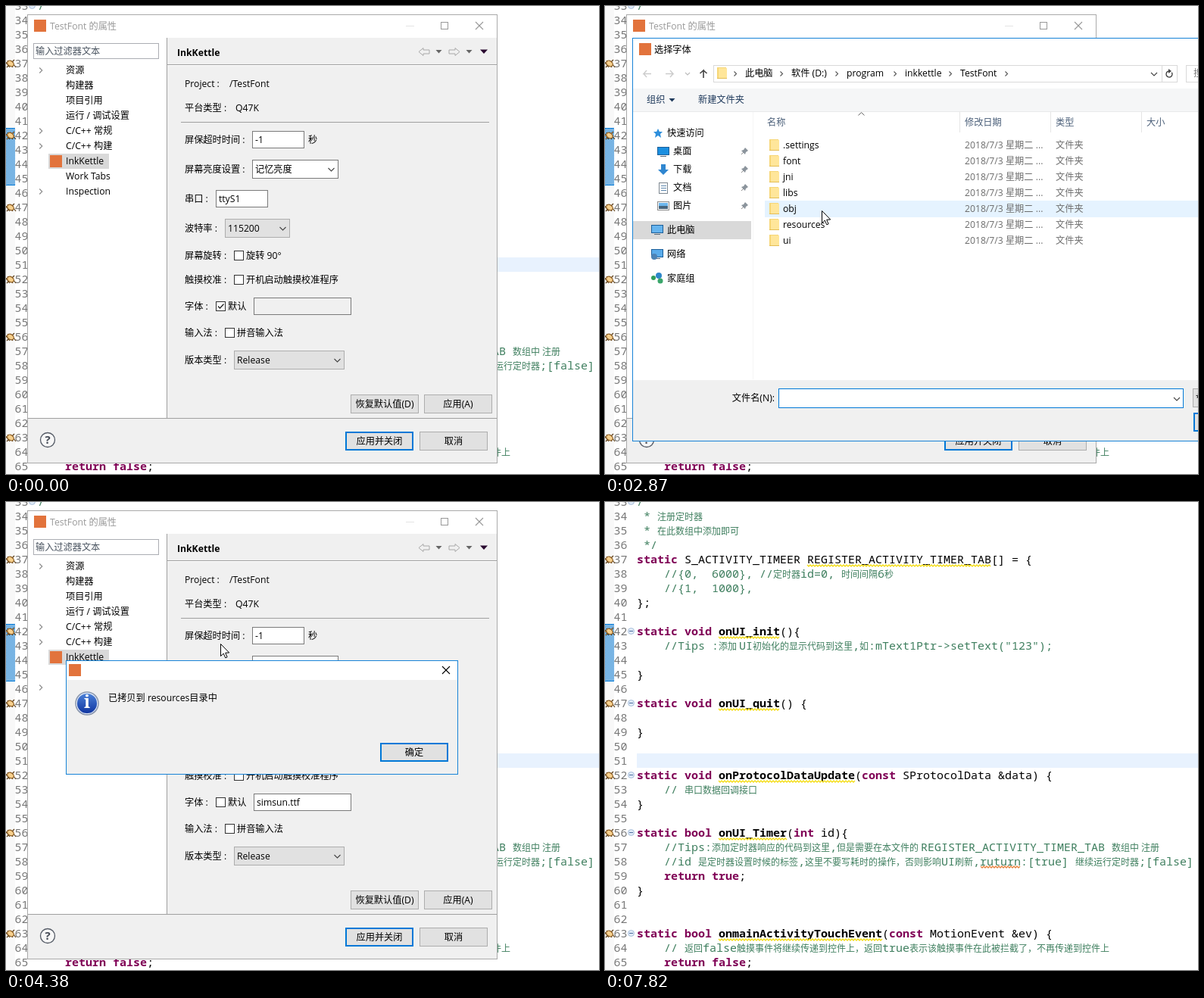
An HTML page with a canvas that plays this animation: 783x618 px, repeating every 8.5 s.

```html
<!DOCTYPE html>
<html lang="zh">
<head>
<meta charset="utf-8">
<style>
html, body { margin: 0; width: 100%; height: 100%; overflow: hidden; background: #fff; }
canvas { display: block; }
</style>
</head>
<body>
<canvas id="stage" width="783" height="618"></canvas>
<script>
const c = document.getElementById('stage').getContext('2d');
const LOOP = 8500;
const CJK = '"Noto Sans CJK SC", "Noto Sans CJK"';
const UI = `12.2px "Open Sans", ${CJK}, sans-serif`;
const MONO = '15px "Noto Sans Mono", "DejaVu Sans Mono", monospace';
const HAN = `12px ${CJK}, sans-serif`;
const BLUE = '#0078d7', FACE = '#f0f0f0', LOGO = '#e2733c';
const PRODUCT = 'InkKettle';

// ---- drawing helpers ----
function rect(x, y, w, h, fill) { c.fillStyle = fill; c.fillRect(x, y, w, h); }
function box(x, y, w, h, fill, stroke, lw = 1) {
  rect(x, y, w, h, fill);
  c.strokeStyle = stroke; c.lineWidth = lw;
  c.strokeRect(x + lw / 2, y + lw / 2, w - lw, h - lw);
}
function text(s, x, yMid, color = '#000', font = UI, align = 'left') {
  c.font = font; c.fillStyle = color; c.textAlign = align;
  c.fillText(s, x, yMid + 4.3);
}
function trace(points, x = 0, y = 0) {
  c.beginPath();
  points.forEach(([px, py]) => c.lineTo(x + px, y + py));
}
function line(points, color, lw = 1, x = 0, y = 0) {
  trace(points, x, y); c.strokeStyle = color; c.lineWidth = lw; c.stroke();
}
function poly(points, color, x = 0, y = 0) {
  trace(points, x, y); c.closePath(); c.fillStyle = color; c.fill();
}
function disc(x, y, r, fill, stroke, lw = 1) {
  c.beginPath(); c.arc(x, y, r, 0, 7);
  if (fill) { c.fillStyle = fill; c.fill(); }
  if (stroke) { c.strokeStyle = stroke; c.lineWidth = lw; c.stroke(); }
}
const down = (x, y, color = '#444', s = 4) => line([[-s, -s / 2], [0, s / 2], [s, -s / 2]], color, 1.1, x, y);
const right = (x, y, color = '#777', s = 3.5) => line([[-s / 2, -s], [s / 2, 0], [-s / 2, s]], color, 1.1, x, y);
const triangle = (x, y, color) => poly([[-4, -2], [4, -2], [0, 2.5]], color, x, y);
const logo = (x, y) => rect(x, y, 16, 16, LOGO);
function cross(x, y, color) {
  line([[-5, -5], [5, 5]], color, 1.1, x, y);
  line([[-5, 5], [5, -5]], color, 1.1, x, y);
}

// ---- pointer ----
// start, end, steps, from, to, bow of the path
const moves = [
  [290, 1090, 11, [690, 612], [282, 395], [0, 0]],
  [1550, 1860, 5, [282, 395], [353, 398], [0, 0]],
  [2480, 3180, 10, [353, 398], [250, 201], [0, 0]],
  [3590, 3990, 6, [250, 201], [283, 187], [0, 0]],
  [4460, 5410, 13, [283, 187], [527, 326], [0, 18]],
  [6100, 6710, 9, [527, 326], [512, 567], [13, 0]],
  [7250, 7820, 8, [512, 567], [792, 616], [0, 0]]
];
function pointerAt(t) {
  if (t < 290 || t >= 7820) return [-99, -99];
  const [start, end, steps, from, to, bow] = moves.filter(m => m[0] <= t).pop();
  const k = Math.min(steps - 1, Math.floor((t - start) / (end - start) * (steps - 1) + 1e-6));
  const p = (k + 1) / steps, e = p * p * (3 - 2 * p);
  return [0, 1].map(i => from[i] + (to[i] - from[i]) * e + bow[i] * Math.sin(Math.PI * p));
}
let mx, my;
const over = (x, y, w, h) => mx >= x && mx < x + w && my >= y && my < y + h;
function drawPointer() {
  const arrow = [[0, 0], [0, 16], [3.7, 12.6], [6.3, 18.3], [8.6, 17.3], [6.2, 11.7], [11.2, 11.5]];
  const x = Math.round(mx) + .5, y = Math.round(my) + .5;
  poly(arrow, '#fff', x, y);
  line([...arrow, [0, 0]], '#000', 1, x, y);
}

// ---- editor ----
const PURPLE = '#7f0055', GREEN = '#3f7f5f', WARNING = '#f4dc10';
// style marks: ~keyword~  ^bold^  `plain`  #comment to end of line; ^ and ` carry a warning underline
const code = {
  33: '#/**', 34: '# * 注册定时器', 35: '# * 在此数组中添加即可', 36: '# */',
  37: '~static~ S_ACTIVITY_TIMEER `REGISTER_ACTIVITY_TIMER_TAB`[] = {',
  38: '    #//{0,  6000}, //定时器id=0, 时间间隔6秒',
  39: '    #//{1,  1000},', 40: '};',
  42: '~static~ ~void~ ^onUI_init^(){',
  43: '    #//Tips :添加 UI初始化的显示代码到这里,如:mText1Ptr->setText("123");',
  45: '}', 47: '~static~ ~void~ ^onUI_quit^() {', 49: '}',
  52: '~static~ ~void~ ^onProtocolDataUpdate^(~const~ SProtocolData &data) {',
  53: '    #// 串口数据回调接口', 54: '}',
  56: '~static~ ~bool~ ^onUI_Timer^(~int~ id){',
  57: '    #//Tips:添加定时器响应的代码到这里,但是需要在本文件的 REGISTER_ACTIVITY_TIMER_TAB 数组中 注册',
  58: '    #//id 是定时器设置时候的标签,这里不要写耗时的操作，否则影响UI刷新,ruturn:[true] 继续运行定时器;[false]',
  59: '    ~return~ ~true~;', 60: '}',
  63: '~static~ ~bool~ ^onmainActivityTouchEvent^(~const~ MotionEvent &ev) {',
  64: '    #// 返回false触摸事件将继续传递到控件上，返回true表示该触摸事件在此被拦截了，不再传递到控件上',
  65: '    ~return~ ~false~;'
};
const isHan = ch => ch > '\u2fff';
function squiggle(x0, x1, y, color) {
  const points = [];
  for (let x = x0, i = 0; x <= x1; x += 2, i++) points.push([x, y + (i % 2 ? 1 : -1)]);
  line(points, color, 1.3);
}
function codeLine(s, y) {
  let x = 42, color = '#000', mark = '', markX = 0, afterHan = false;
  for (const ch of s) {
    if (ch === '#') { color = GREEN; continue; }
    if ('~^`'.includes(ch)) {
      if (mark && ch !== '~') squiggle(markX, x, y + 3, WARNING);
      mark = mark ? '' : ch;
      markX = x;
      color = mark === '~' ? PURPLE : '#000';
      continue;
    }
    const han = isHan(ch), bold = mark === '~' || mark === '^';
    c.textAlign = 'left';
    c.font = han ? HAN : (bold ? 'bold ' : '') + MONO;
    c.fillStyle = color;
    c.fillText(ch, x, y);
    x += han ? 12 : ch === ' ' && afterHan ? 3 : 9;
    afterHan = han;
  }
}
function bug(y) {
  for (const d of [-4, 0, 4]) line([[d - 4, -4], [d + 3, 5]], '#5a3c14', 1.2, 6, y);
  line([[1, 5], [11, -5]], '#5a3c14', 1.2, 0, y);
  c.beginPath(); c.ellipse(6, y, 4.6, 3.4, .6, 0, 7);
  c.fillStyle = '#f6cf8c'; c.fill();
  c.strokeStyle = '#8a5a20'; c.lineWidth = 1.2; c.stroke();
}
function drawEditor() {
  rect(0, 0, 783, 618, '#fff');
  rect(0, 0, 12, 618, '#f8f8f8');
  rect(42, 332, 741, 19, '#e8f2fe');
  rect(0, 161, 12, 76, FACE);
  c.fillStyle = BLUE;
  for (let y = 161; y < 236; y++) for (let x = y % 2; x < 12; x += 2) c.fillRect(x, y, 1, 1);
  rect(0, 161, 12, 1, BLUE);
  rect(0, 236, 12, 1, BLUE);
  for (let n = 33; n <= 65; n++) {
    const y = 24 + (n - 34) * 19;
    c.font = MONO; c.fillStyle = '#787878'; c.textAlign = 'left';
    c.fillText(n, 11.5, y);
    if (code[n]) codeLine(code[n], y);
  }
  for (const n of [33, 37, 42, 47, 52, 56, 63]) {
    const y = 19 + (n - 34) * 19;
    if (n !== 33) bug(y);
    if (n !== 37) {
      disc(34.5, y - .5, 4, '#dfeaf7', '#a9bfdc');
      line([[32, y - .5], [37, y - .5]], '#4d6f9e');
    }
  }
  squiggle(496, 549, 482, '#e8823c');
}

// ---- controls ----
function button(x, y, label, primary) {
  const hot = over(x, y, 90, 25);
  box(x, y, 90, 25, hot ? '#e5f1fb' : '#e1e1e1', primary || hot ? BLUE : '#adadad', primary ? 2 : 1);
  text(label, x + 45, y + 12.5, '#000', UI, 'center');
}
function field(x, y, w, value, fill = '#fff') {
  box(x, y, w, 23, fill, '#7a7a7a');
  text(value, x + 4, y + 11.5);
}
function combo(x, y, w, value, fill = '#e1e1e1') {
  box(x, y, w, 25, fill, fill === '#fff' ? '#7a7a7a' : '#adadad');
  text(value, x + 4, y + 12.5);
  down(x + w - 9.5, y + 13);
}
function check(x, y, label, mark, hot) {
  box(x, y, 13, 13, hot ? '#f2f8fd' : '#fff', hot ? BLUE : '#333');
  if (mark) line([[3, 6.5], [5.5, 9], [10.5, 3.5]], mark, 1.3, x, y);
  text(label, x + 16, y + 6.5);
}
function windowTitle(label, active) {
  const ink = active ? '#000' : '#999';
  logo(37, 18);
  text(label, 58, 26.5, ink);
  line([[528, 26.5], [539, 26.5]], active ? '#ccc' : '#e4e4e4');
  c.strokeStyle = ink; c.strokeRect(574.5, 21.5, 9, 9);
  cross(625, 26, ink);
}

// ---- properties window ----
function drawProperties(t) {
  const active = t >= 1170 && t < 2020 || t >= 4300 && t < 4380 || t >= 5640;
  box(28, 11, 621, 593, '#fff', active ? '#1883d7' : '#aaa');
  windowTitle('TestFont 的属性', active);
  rect(213, 42, 435, 502, FACE);
  rect(29, 545, 619, 58, FACE);
  rect(212, 42, 1, 502, '#a0a0a0');
  rect(29, 544, 619, 1, '#a0a0a0');
  rect(213, 77, 435, 1, '#a0a0a0');
  rect(213, 78, 435, 1, '#fff');

  box(36, 49, 166, 21, '#fff', '#abadb3');
  text('输入过滤器文本', 39, 60, '#4a5460');
  rect(56, 195, 80, 20, '#d9d9d9');
  logo(58, 197);
  ['资源', '构建器', '项目引用', '运行 / 调试设置', 'C/C++ 常规', 'C/C++ 构建', PRODUCT, 'Work Tabs', 'Inspection']
    .forEach((s, i) => {
      text(s, 79, 85 + i * 20);
      if ([0, 4, 5, 8].includes(i)) right(46, 85 + i * 20, '#8a8a8a');
    });

  text(PRODUCT, 226, 61.5, '#000', 'bold ' + UI);
  const arrow = [[-7, 0], [-1, -5], [-1, -2.5], [7, -2.5], [7, 2.5], [-1, 2.5], [-1, 5], [-7, 0]];
  line(arrow, '#a8a8a8', 1, 552, 60.5);
  line(arrow.map(([x, y]) => [-x, y]), '#a8a8a8', 1, 592, 60.5);
  triangle(571.5, 60, '#666'); triangle(611.5, 60, '#666');
  poly([[-5, -2.5], [5, -2.5], [0, 3]], '#2a0a30', 631, 60);

  [['Project', 103], ['平台类型', 135], ['屏保超时时间', 177], ['屏幕亮度设置', 216], ['串口', 255], ['波特率', 294],
   ['屏幕旋转', 330], ['触摸校准', 362], ['字体', 397], ['输入法', 432], ['版本类型', 468]]
    .forEach(([s, y]) => text(s + ' :', 236, y));
  text('/TestFont', 295, 103);
  text('Q47K', 303, 135);
  rect(231, 153, 407, 1, '#a0a0a0');
  field(325, 165, 69, '-1'); text('秒', 399, 177);
  combo(325, 203, 114, '记忆亮度', '#fff');
  field(277, 243, 69, 'ttyS1');
  combo(289, 281, 86, '115200');
  check(301, 323, '旋转 90°');
  check(301, 355, '开机启动触摸校准程序');
  const mark = t < 1170 ? '#222' : t < 1470 ? '#8dbde6' : null;
  check(277, 390, '默认', mark, over(277, 390, 13, 13));
  field(327, 385, 129, t >= 4300 ? 'simsun.ttf' : '', t < 1250 ? FACE : '#fff');
  check(289, 425, '拼音输入法');
  combo(301, 455, 146, 'Release');
  button(455, 513, '恢复默认值(D)'); button(552, 513, '应用(A)');
  button(448, 562, '应用并关闭', true); button(546, 562, '取消');
  disc(55, 573, 9.5, '#f7f7f7', '#555b66', 1.3);
  text('?', 55, 573.5, '#444a55', 'bold 15px "Open Sans", sans-serif', 'center');
}

// ---- file chooser ----
function folder(x, y) {
  rect(x, y, 12, 15, '#f6d676');
  rect(x + 2, y + 1, 11, 14, '#ffe69a');
  rect(x, y + 14, 13, 1, '#e3bd55');
}
function screen(x, y, color = '#1b8fe0') {
  box(x, y, 16, 11, color, '#1c5f9a');
  rect(x + 4, y + 12, 8, 1, '#567');
}
function pin(x, y) {
  line([[-4, 4], [-1, 1]], '#888', 1, x, y);
  poly([[-4, -1], [-1, -2], [1, -5], [5, -1], [2, 1], [1, 4]], '#8b949c', x, y);
}
function drawSidebar() {
  rect(37, 284, 156, 24, '#d9d9d9');
  poly([[0, -6], [2, -2], [6, -2], [3, 1], [4, 6], [0, 3], [-4, 6], [-3, 1], [-6, -2], [-2, -2]], '#2f8fdc', 70, 168);
  [['快速访问', 82, 168], ['桌面', 90, 192], ['下载', 90, 216], ['文档', 90, 240], ['图片', 90, 264],
   ['此电脑', 82, 296], ['网络', 82, 328], ['家庭组', 82, 360]].forEach(([s, x, y]) => {
    text(s, x, y);
    if (x === 90) pin(184, y);
  });
  screen(69, 186);
  poly([[-3, -7], [3, -7], [3, 0], [7, 0], [0, 7], [-7, 0], [-3, 0]], '#2f86d0', 77, 216);
  box(71, 233, 12, 15, '#fff', '#7d8790');
  for (let y = 237; y < 246; y += 3) rect(74, y, 7, 1, '#5c86ad');
  box(69, 258, 16, 12, '#fff', '#8a8a8a');
  rect(71, 260, 12, 4, '#6bb5ec'); rect(71, 264, 12, 4, '#47657d');
  screen(61, 289, '#66b4ee');
  screen(61, 321, '#5aaceb'); disc(65, 331, 4, '#4c83b5');
  disc(64, 359, 3, '#2f9e5b'); disc(71, 356, 4, '#2d86c9'); disc(73, 363, 3.5, '#3aa66a');
}
function drawFileRow(i, [name, date, type], selected) {
  const y = 184 + i * 21;
  if (selected) box(211, y - 11, 580, 22, '#cce8ff', '#99d1ff');
  else if (over(211, y - 10, 580, 21)) rect(211, y - 11, 580, 22, '#e5f3ff');
  if (type === '文件夹') folder(217, y - 8);
  else { box(217, y - 8, 12, 15, '#fff', '#8a8a8a'); text('A', 223, y, '#2d6ca8', UI, 'center'); }
  text(name, 235, y);
  text(date, 475, y, '#6d6d6d');
  text(type, 595, y, '#6d6d6d');
}
function drawChooser(t) {
  const inside = t >= 3430, picked = t >= 4070;
  box(36, 42, 760, 533, '#fff', '#1883d7');
  logo(45, 49);
  text('选择字体', 65, 58);

  const arrow = [[5, 0], [-5, 0], [-1, -4.5], [-5, 0], [-1, 4.5]];
  line(arrow, inside ? '#444' : '#ccc', 1.4, 56, 89.5);
  line(arrow.map(([x, y]) => [-x, y]), '#ccc', 1.4, 85, 89.5);
  down(109, 89.5, '#bbb', 3);
  line(arrow.map(([x, y]) => [y, x]), '#444', 1.6, 130, 90);
  box(143, 78, 613, 23, '#fff', '#d9d9d9');
  rect(735, 78, 1, 23, '#d9d9d9');
  folder(148, 81);
  const crumbs = [['此电脑', 185], ['软件 (D:)', 246], ['program', 319], [PRODUCT.toLowerCase(), 396], ['TestFont', 469]];
  if (inside) crumbs.push(['font', 543]);
  crumbs.forEach(([s, x]) => { text(s, x, 89); right(x - 13, 89.5, '#555', 3); });
  if (t >= 2480 && !inside) right(530, 89.5, '#555', 3);
  down(725, 90);
  c.beginPath(); c.arc(745, 90, 4, -.6, 4.7);
  c.strokeStyle = '#444'; c.lineWidth = 1.4; c.stroke();
  poly([[0, -3], [4, 0], [0, 3]], '#444', 744, 86);
  box(767, 78, 40, 23, '#fff', '#d9d9d9');
  text('搜索', 777, 89, '#777');

  rect(37, 109, 746, 30, '#f5f6f7'); rect(37, 139, 746, 1, '#e8e9ea');
  text('组织', 55, 124, '#1e395b'); triangle(88.5, 124, '#1e395b');
  text('新建文件夹', 123, 124, '#1e395b');
  drawSidebar();
  rect(195, 140, 1, 353, '#f5f5f5');

  line([[-4, 2], [0, -2], [4, 2]], '#666', 1, 338.5, 142.5);
  [['名称', 214], ['修改日期', 475], ['类型', 595], ['大小', 715]].forEach(([s, x]) => {
    text(s, x, 154, '#4c607a');
    if (x > 214) rect(x - 7, 140, 1, 27, '#e5e5e5');
  });
  const date = '2018/7/3 星期二 ...';
  const rows = inside
    ? [['simsun.ttf', date, 'TrueType 字体文件']]
    : ['.settings', 'font', 'jni', 'libs', 'obj', 'resources', 'ui'].map(s => [s, date, '文件夹']);
  if (t >= 2250) rows.forEach((row, i) => drawFileRow(i, row, inside ? picked : i === 1 && t >= 3260));

  rect(37, 494, 746, 80, FACE);
  text('文件名(N):', 224, 518, '#000', UI, 'right');
  box(229, 505, 535, 26, '#fff', t < 3350 ? BLUE : '#7a7a7a');
  if (picked) text('simsun.ttf', 234, 518);
  else if (t < 3350 && (t < 2700 || t >= 3230)) rect(233, 510, 1, 17, '#000');
  down(755, 519);
  box(776, 505, 40, 25, '#e1e1e1', '#adadad');
  text('*.ttf', 780, 518);
  box(777, 537, 90, 25, '#e1e1e1', BLUE, 2);
}

// ---- message box ----
function drawMessage() {
  box(79, 209, 518, 151, FACE, '#1883d7');
  rect(80, 210, 516, 25, '#fff');
  logo(83, 214);
  cross(581, 222, '#000');
  const glow = c.createLinearGradient(0, 251, 0, 281);
  glow.addColorStop(0, '#4f86dc'); glow.addColorStop(1, '#0b2f9c');
  disc(107, 266, 15, glow, '#8d98ab', 1.5);
  disc(107, 266, 13.7, null, '#e6ecf6', 1.2);
  text('i', 107, 268, '#fff', 'bold 23px "Noto Serif", serif', 'center');
  text('已拷贝到 resources目录中', 135, 259);
  button(494, 318, '确定', true);
}

function draw(now) {
  const t = now % LOOP;
  [mx, my] = pointerAt(t);
  drawEditor();
  if (t < 7170) drawProperties(t);
  if (t >= 2170 && t < 4300) drawChooser(t);
  if (t >= 4380 && t < 5560) drawMessage();
  drawPointer();
}
const origin = performance.now();
function tick() {
  draw(performance.now() - origin);
  requestAnimationFrame(tick);
}
tick();
</script>
</body>
</html>
```
